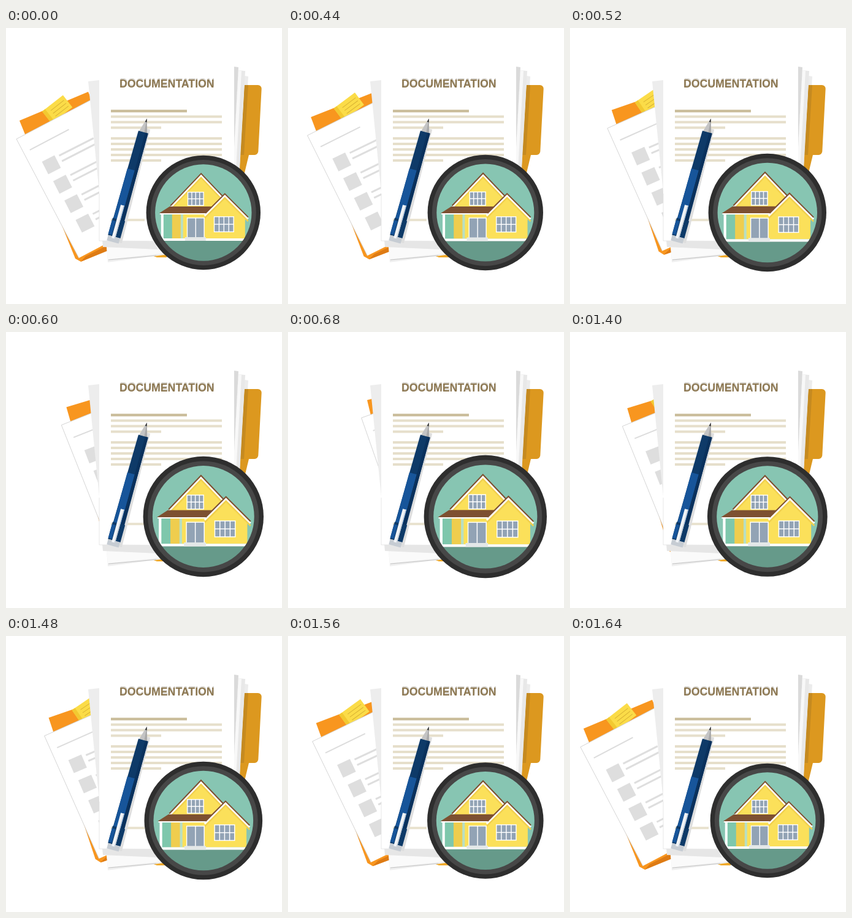
An HTML page with a canvas that plays this animation: 450x450 px, repeating every 1.92 s.

```html
<!DOCTYPE html>
<html lang="en">
<head>
<meta charset="utf-8">
<title>Documentation</title>
<style>
  html, body { margin: 0; width: 100%; height: 100%; overflow: hidden; background: #fff; }
  canvas { display: block; width: 450px; height: 450px; }
</style>
</head>
<body>
<canvas id="stage" width="450" height="450"></canvas>
<script>
const ctx = document.getElementById('stage').getContext('2d');
const LOOP = 1920, TICK = 40;

function trace(pts) {
  ctx.beginPath();
  for (let i = 0; i < pts.length; i += 2) ctx.lineTo(pts[i], pts[i + 1]);
}
function poly(color, ...pts) {
  trace(pts);
  ctx.closePath();
  ctx.fillStyle = color;
  ctx.fill();
}
function line(color, width, ...pts) {
  trace(pts);
  ctx.strokeStyle = color;
  ctx.lineWidth = width;
  ctx.stroke();
}
function rect(color, x, y, w, h) {
  ctx.fillStyle = color;
  ctx.fillRect(x, y, w, h);
}
function disc(color, x, y, r) {
  ctx.beginPath();
  ctx.arc(x, y, r, 0, Math.PI * 2);
  ctx.fillStyle = color;
  ctx.fill();
}
// Draws in a frame with its origin at x, y, turned by an angle in degrees
function placed(x, y, angle, paint) {
  ctx.save();
  ctx.translate(x, y);
  ctx.rotate(angle * Math.PI / 180);
  paint();
  ctx.restore();
}

// 0 = checklist out, lens small; 1 = checklist tucked away, lens large
function progress(t) {
  const steps = from => Math.floor((t - from) / TICK) + 1;
  if (t < 440) return 0;
  if (t < 1320) return Math.min(1, steps(440) / 7);
  return Math.max(0, 1 - steps(1320) / 9);
}

function drawNote() {
  const w = 43, h = 25;
  rect('#fbdc48', 0, 0, w, h);
  rect('#f2c931', 0, 0, 6, h);
  for (let y = 7; y < h - 4; y += 6) rect('#d9b334', 12, y, 27, 1);
}

function drawTask() {
  rect('#dedede', -11.5, -11.5, 23, 23);
  for (const y of [-9, 1]) rect('#dedede', 18, y, 63, 3);
}

function drawChecklist(p) {
  placed(22 + 107 * p, 151 - 40 * p, 8.4 * p, () => {
    // folder, with its corner as the pivot
    poly('#f8961f', 0, 0, 112, -47, 208, 184, 100, 230, 91, 225);
    poly('#de7b14', 100, 230, 108, 221, 208, 171, 208, 186);
    placed(37, -15, -38, drawNote);

    placed(-5, 30, -27.7, () => {
      rect('#fff', 0, 0, 148, 219);
      line('#cfcfcf', 0.8, 148, 0, 0, 0, 0, 219);
      rect('#dcdcdc', 11, 25, 72, 2);
    });
    for (let i = 0; i < 4; i++)
      placed(52 + 18.3 * i, 72 + 31.7 * i, -27, drawTask);
  });
}

function drawFolderTab() {
  // sheets lean the same way: their tops sit further right
  const sheet = (color, x, y, w) => poly(color, x, y, x + w, y + 1, x + w - 9, 230, x - 9, 230);

  sheet('#ececec', 389, 78, 6);
  poly('#dc981f', 389, 93, 400, 93, 396, 207, 388, 240, 380, 240);
  ctx.beginPath();
  ctx.moveTo(389, 93);
  ctx.arcTo(417, 93, 411, 207, 6);
  ctx.arcTo(411, 207, 383, 207, 6);
  ctx.lineTo(383, 207);
  ctx.fill();
  poly('#c58a20', 389, 93, 395, 93, 388, 207, 382, 207);
  sheet('#e8e8e8', 379, 69, 11);
  sheet('#f8f8f8', 379, 69, 5);
  sheet('#dadada', 372, 63, 7);
}

function drawMainSheets() {
  // lower sheets
  poly('#f0aa2c', 238, 371, 262, 366, 262, 374, 246, 374);
  poly('#efefef', 164, 356, 258, 354, 264, 369, 166, 382);
  poly('#fafafa', 164, 356, 258, 354, 262, 367, 166, 377);
  line('#b9b9b9', 0.8, 167, 378, 245, 371);
  poly('#e6e6e6', 157, 346, 240, 346, 248, 361, 158, 357);

  // front sheet and the one peeking out at its left
  poly('#ededed', 134, 87, 152, 85, 155, 268, 152, 268);
  poly('#fff', 152, 64, 372, 63, 372, 230, 300, 349, 152, 347);
  line('#dddddd', 0.7, 152, 270, 152, 347, 240, 347.5);

  ctx.font = 'bold 17.7px "Liberation Sans", Arial, sans-serif';
  ctx.fillStyle = '#d6d3cd';
  ctx.fillText('DOCUMENTATION', 185.4, 94.8);
  ctx.fillStyle = '#8d7852';
  ctx.fillText('DOCUMENTATION', 185, 97.2);

  const paragraph = (y, count) => {
    for (let i = 0; i < count; i++)
      rect('#e6dfcb', 171, y + 9 * i, i < count - 1 ? 181 : 82, 4);
  };
  rect('#c9bc99', 171, 133.3, 124, 4.2);
  paragraph(142.5, 3);
  paragraph(178, 5);
  rect('#e9e3d0', 171, 311, 55, 4);
}

function drawPen() {
  const navy = '#0e3a68', dark = '#0a315c', blue = '#17559a';
  // symmetric piece between two heights, each with its own half width
  const taper = (color, y0, w0, y1, w1) => poly(color, -w0, y0, w0, y0, w1, y1, -w1, y1);

  placed(229.5, 148.5, 15.5, () => {
    placed(5, 3, 0, () => taper('#dedede', 12, 5, 203, 10));
    taper('#c4c4c4', 0, 0.5, 23, 7);
    poly('#a9a9a9', 0, 0, 7, 23, 2, 23);
    taper('#333', -1, 0, 5, 1.5);

    taper(navy, 22, 8, 172, 9.5);
    rect(blue, -9, 86, 12.5, 86);
    rect(dark, 3.5, 22, 5, 150);
    taper(navy, 170, 10.5, 199, 10.5);
    rect(blue, -10.5, 174, 6, 23);
    taper('#c6ccd3', 199, 10, 208, 10);
    rect('#f1f4f7', -3.5, 146, 6, 56);
    rect('#c3ccd6', 1, 146, 1.5, 56);
  });
}

function drawWindow(x, y, w, h, cols, rows) {
  const gap = 1.4, cw = (w - gap) / cols, ch = (h - gap) / rows;
  rect('#fff', x, y, w, h);
  for (let i = 0; i < cols; i++)
    for (let j = 0; j < rows; j++)
      rect('#92a3b5', x + gap + i * cw, y + gap + j * ch, cw - gap, ch - gap);
}

// Wall under a pitched roof; the trim lines follow the slope
function drawGable(x, y, slope, left, right) {
  const x0 = x - left, x1 = x + right, base = 343;
  const trim = (color, width, drop) =>
    line(color, width, x0, y + left * slope + drop, x, y + drop, x1, y + right * slope + drop);
  poly('#fbe05a', x, y, x1 - 5, y + (right - 5) * slope, x1 - 5, base,
    x0 + 4, base, x0 + 4, y + (left - 4) * slope);
  trim('#f1d04d', 2.5, 7);
  trim('#fff', 3, 3.2);
  trim('#7d5031', 2, 0.4);
}

function drawHouse() {
  drawGable(318.3, 237, 1.05, 50, 44);

  // porch
  rect('#7ec7ac', 257, 302, 14, 41);
  rect('#efcd4e', 271, 302, 15, 41);
  rect('#b8dfc3', 285, 302, 4, 41);
  rect('#fff', 253, 302, 4, 41);

  drawGable(357, 270, 1, 33, 38);
  poly('#7d5031', 250, 302, 267, 291, 337, 291, 326, 302);
  rect('#fff', 251, 302, 75, 2);

  drawWindow(296, 267, 27, 23, 4, 2);
  drawWindow(339, 307, 33, 26, 4, 2);
  drawWindow(295, 309, 29, 34, 2, 1);

  rect('#fff', 253, 343, 140, 4);
  rect('#e4e8e8', 292, 341, 34, 6);
}

function drawLens(p) {
  const zoom = 1 + 0.075 * p;
  ctx.save();
  ctx.translate(321.8, 301);
  ctx.scale(zoom, zoom);
  disc('#2e2e2e', 0, 0, 93.2);
  disc('#474747', 0, 0, 86);
  ctx.beginPath();
  ctx.arc(0, 0, 78.7, 0, Math.PI * 2);
  ctx.clip();
  rect('#87c5b2', -80, -80, 160, 126);
  rect('#669a8a', -80, 46, 160, 40);
  ctx.translate(-322, -301);
  drawHouse();
  ctx.restore();
}

function draw(now) {
  const p = progress(now % LOOP);
  rect('#fff', 0, 0, 450, 450);
  drawFolderTab();
  drawChecklist(p);
  drawMainSheets();
  drawPen();
  drawLens(p);
}

const start = performance.now();
function tick() {
  draw(performance.now() - start);
  requestAnimationFrame(tick);
}
tick();
</script>
</body>
</html>
```
